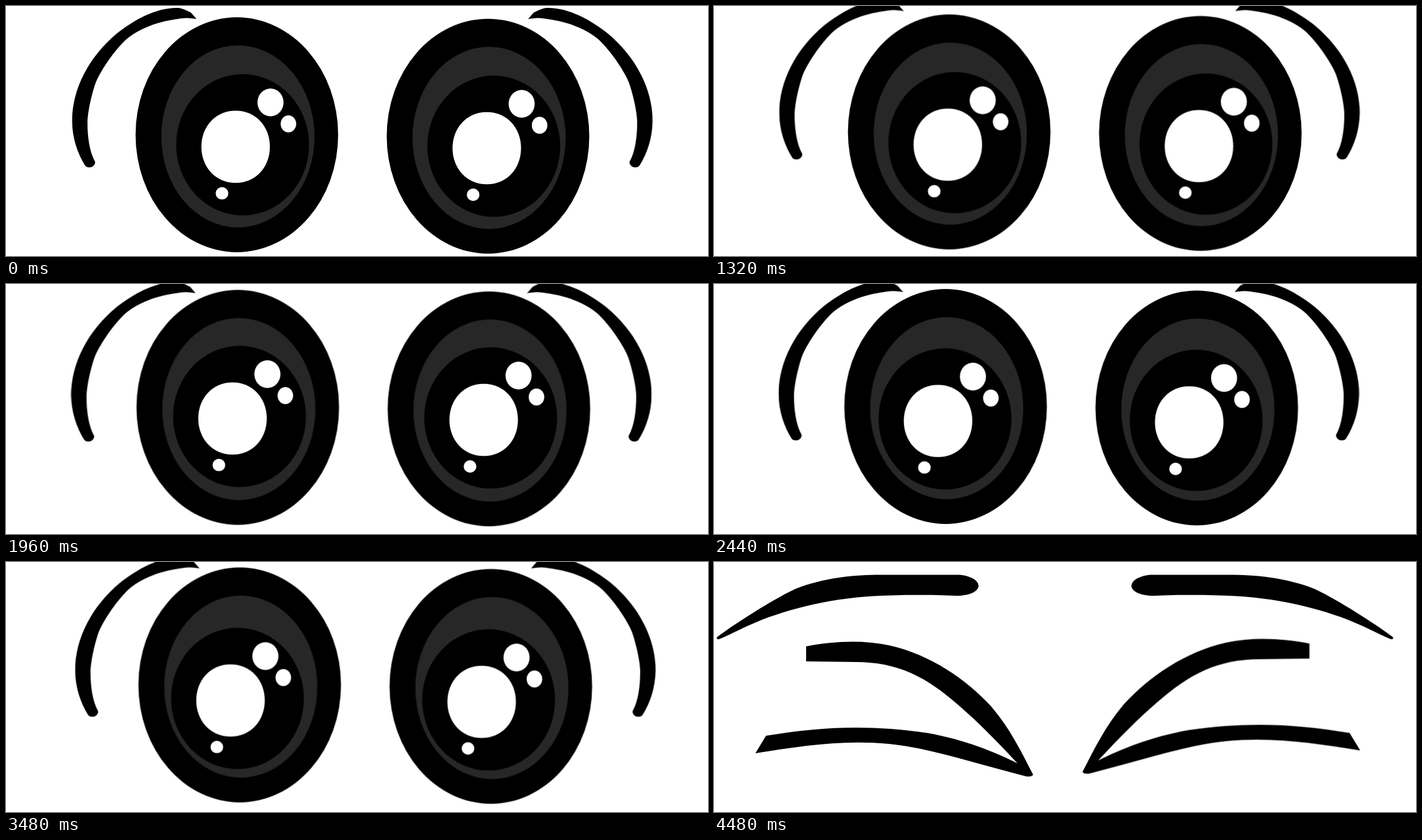
These frames come from a looping animation (1120 by 400 pixels, 4.64 s). An HTML page:

```html
<!DOCTYPE html>
<html lang="en">
<head>
<meta charset="utf-8">
<title>Blinking eyes</title>
<style>
  html, body { margin: 0; width: 100%; height: 100%; overflow: hidden; background: #fff; }
  svg { display: block; width: 100%; height: 100%; }
  .white { fill: #fff; }
  .iris { fill: #272727; }
  #shut { opacity: 0; }
</style>
</head>
<body>
<svg viewBox="0 0 1120 400">
  <defs>
    <path id="brow" d="M304 20.8L295 10.5Q282 3.5 275 3C240 2 205 22 178 43C132 81 105.5 133 105.5 184C105.5 210 114 236 126 255C129 259.7 138 259.3 141 254Q143 251 142 249C133 233 130 208 130 188C130 168 138 137 143 123C150 106 168 77 190 55C215 33 252 22 287 19.3Q294 19 304 20.8Z"/>
    <g id="ball">
      <ellipse cx="368.3" cy="206" rx="161.6" ry="187.9"/>
      <ellipse class="iris" cx="370" cy="208.7" rx="122.2" ry="145.7"/>
    </g>
    <g id="pupil">
      <ellipse cx="377.5" cy="222" rx="106" ry="113"/>
      <path class="white" d="M366.3 167.4C398 167.4 421 192 421 225.2C421 258 398 283 366.3 283C335 283 311.7 258 311.7 225.2C311.7 192 335 167.4 366.3 167.4Z"/>
      <ellipse class="white" cx="422" cy="154.2" rx="20.8" ry="22.2"/>
      <ellipse class="white" cx="450.6" cy="188.6" rx="12.4" ry="13.6"/>
      <ellipse class="white" cx="344.6" cy="299.7" rx="10.1" ry="9.9"/>
    </g>
    <path id="shutBrow" d="M5 120C35 98 90 62 130 43C175 25 225 20.5 265 20.5H388C405 20.5 422 28 422 38C422 48 405 54.5 386 54C350 52.5 300 52 255 54.5C180 58.5 105 79 60 99.5C40 108 20 119 8 123.5Q3 124 5 120Z"/>
    <path id="shutLid" d="M147 135C190 127 235 124 280 133.5C345 148 403 188 443 232C472 266 490 303 509 340Q508 344 498 343C440 328 385 311 330 299C235 279 155 292 66 306L83 278C170 263 250 260 340 273.5C400 284 450 305 484 322C450 285 420 255 390 229C340 185 295 160 225 160L147 159Z"/>
  </defs>

  <g id="open">
    <g id="balls">
      <use href="#ball"/>
      <use href="#ball" x="400.7" y="2.3"/>
    </g>
    <g id="pupils">
      <use href="#pupil"/>
      <use href="#pupil" x="400.7" y="2.3"/>
    </g>
    <g id="brows">
      <use href="#brow"/>
      <use href="#brow" transform="translate(1137) scale(-1 1)"/>
    </g>
  </g>
  <g id="shut">
    <use href="#shutBrow"/>
    <use href="#shutBrow" transform="translate(1088) scale(-1 1)"/>
    <use href="#shutLid"/>
    <use href="#shutLid" transform="translate(1097 -4.5) scale(-1 1)"/>
  </g>
</svg>
<script>
const LOOP = 4640, BLINK = 4480, STEP = 40;

// Evenly timed points of each part's closed drift path, in px from rest.
const paths = {
  brows:  { x: [0, 5.2, -1.2, -1.5, -2, 5.4, 2.4],     y: [0, -5.8, -12.8, -6.3, -8.6, -11.7, -7.6] },
  balls:  { x: [0, 3.8, 7, 1.6, 1.4, 3.3, 5.3],        y: [0, -1.9, -4.3, -8.4, -10.2, -9.9, -7.6] },
  pupils: { x: [0, 4.9, 7, -4.5, -9.5, -10.4, -4.5],   y: [0, -2.3, -3.1, -10.1, -5.2, -2.7, -4.9] }
};

// Closed Catmull-Rom curve; phase runs from 0 to 1.
function curve(points, phase) {
  const n = points.length, i = Math.floor(phase * n), u = phase * n - i;
  const [a, b, c, d] = [-1, 0, 1, 2].map(k => points[(i + k + n) % n]);
  return b + u / 2 * (c - a + u * (2 * a - 5 * b + 4 * c - d + u * (3 * (b - c) + d - a)));
}

// A hair early, so that rounding never delays a step.
const at = t => Math.max(t - 0.5, 0) / LOOP;

function play(id, frames) {
  document.getElementById(id).animate(
    frames.map(f => ({ ...f, easing: "steps(1, end)" })),
    { duration: LOOP, iterations: Infinity });
}

for (const [id, { x, y }] of Object.entries(paths)) {
  const frames = [];
  for (let t = 0; t <= BLINK; t += STEP) {
    const phase = t / BLINK;
    frames.push({ offset: at(t), transform: `translate(${curve(x, phase)}px, ${curve(y, phase)}px)` });
  }
  frames.push({ ...frames[0], offset: 1 });
  play(id, frames);
}

const swap = (before, after) => [
  { offset: 0, opacity: before }, { offset: at(BLINK), opacity: after }, { offset: 1, opacity: after }
];
play("open", swap(1, 0));
play("shut", swap(0, 1));
</script>
</body>
</html>
```
